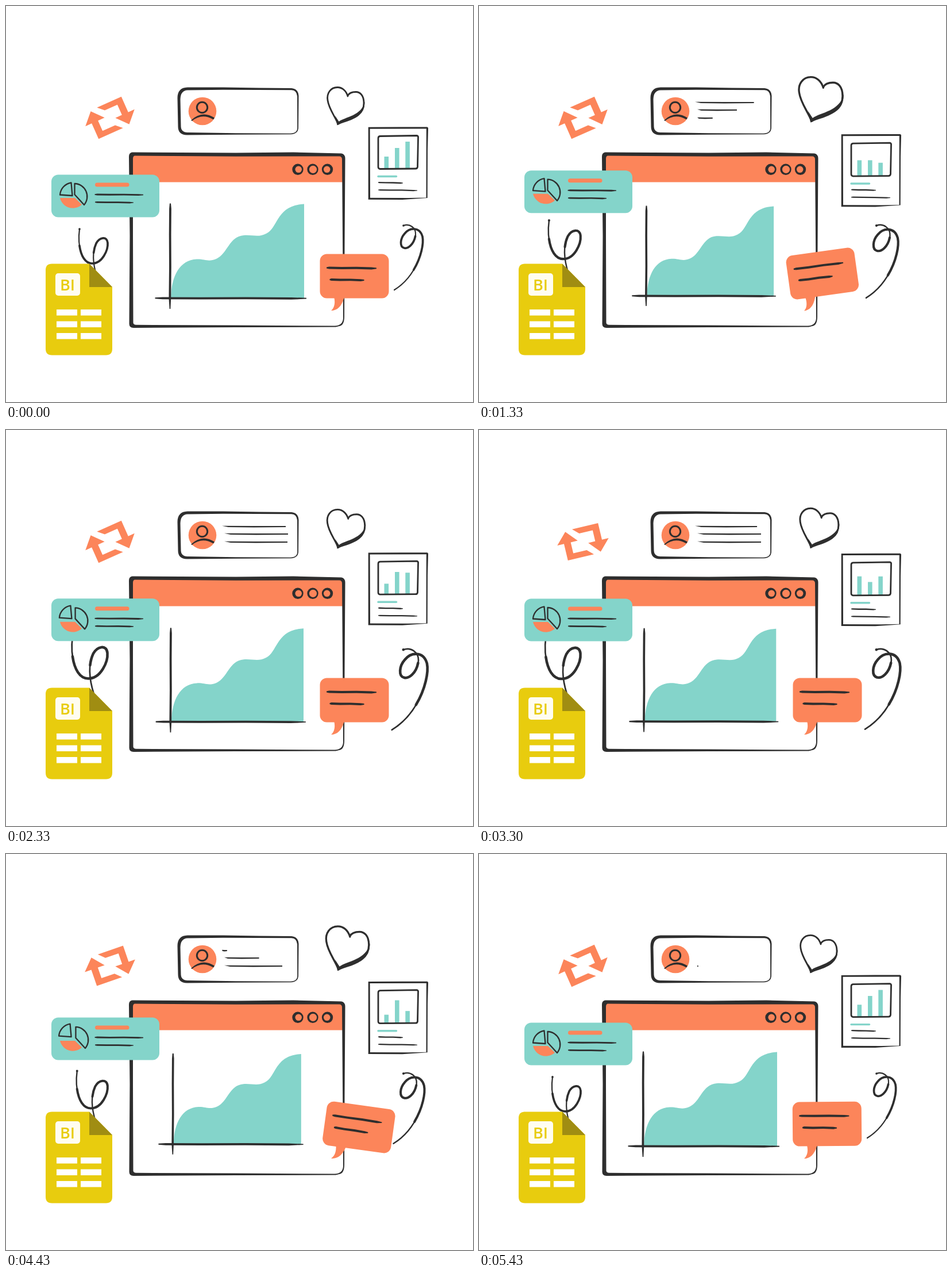
An HTML page for the animation above (5510 ms loop, 813x689 px).

```html
<!DOCTYPE html>
<html lang="en">
<head>
<meta charset="utf-8">
<title>Dashboard illustration</title>
<style>
  html, body { margin: 0; width: 100%; height: 100%; overflow: hidden; background: #fff; }
  svg { display: block; width: 100vw; height: 100vh; }
  .ink { fill: #2e2e2e; fill-rule: evenodd; }
  .line { fill: none; stroke: #2e2e2e; stroke-linejoin: round; stroke-linecap: round; }
  .orange { fill: #fc855a; }
  .teal { fill: #84d4ca; }
  .yellow { fill: #e8cc0e; }
  text { font: 600 27px "Open Sans", sans-serif; }
</style>
</head>
<body>
<svg viewBox="0 0 813 689" xmlns="http://www.w3.org/2000/svg">
  <g id="arrows">
    <path id="arrow" class="orange" d="M-13.500-25.500H33V4H45L26 24 8.500 4H21V-15.500H-3Z"/>
    <use href="#arrow" transform="rotate(180)"/>
  </g>

  <g id="profile">
    <path class="ink" d="M316 141.500L378 141.500 440 142.500 497 143Q508.500 144 509.500 156L509 212Q508.500 222.500 496 223.300L400 223.800 315 224.500Q299.500 224 299.500 210L298.500 160Q298.500 142 316 141.500Z
      M316 146.500Q304 147 303.500 162L304.500 209Q304.500 219.500 316 220L400 221.200 495 221.800Q507 221.500 507.200 212L507 157Q506 146.500 497 146.200L378 145.700Z"/>
    <circle class="orange" cx="342" cy="183" r="24.300"/>
    <circle class="line" cx="341.500" cy="176.500" r="9.200" stroke-width="3"/>
    <path class="ink" d="M322 199Q341 180.500 363 194.500L361 197.500Q341 186 324 200Z"/>
    <g id="rows"></g>
  </g>

  <g id="heart">
    <path class="line" stroke-width="2.800" d="M595 157C592 147 585 141.500 577 141.500C565 141.500 558 152 560 164C562 179 573 192 578 205.500C588 196 623 198 623 169C623 155 616 149.500 609 149.500C601 149.500 597 152 595 156"/>
    <path class="ink" d="M576.500 207.500C588 200 625 199 624.500 166C620 191 590 193 579.500 201L573 191Z"/>
  </g>

  <g id="report">
    <path class="ink" d="M630.700 210.800L690 210.500 733.500 210.500 735 212 734 250 733.700 334 690 337 630.700 336.800Z
      M633.600 213.700L634 333.700 700 334 731.500 333.500 731.800 213.500Z"/>
    <g id="bars" class="teal"></g>
    <path class="line" stroke-width="2.800" d="M651 226.500L715 225.500Q718 226 717.500 229L716.500 280Q716 283 713 283L651 283.500Q648 283 648 280L648 230Q648 227 651 226.500Z"/>
    <path fill="none" stroke="#84d4ca" stroke-width="3.400" stroke-linecap="round" d="M648 296.500H679.500"/>
    <g id="reportLines"></g>
  </g>

  <g id="window">
    <path class="orange" d="M220 260H586V306.500H220Z"/>
    <path class="ink" d="M220 254.500L400 255.500 500 254.500 584 256.500Q590.500 258 590.500 265L589.500 420 589 540Q589 556 580 557L574 558.500 400 559 222 560Q214.500 560 214.500 553L215.500 400 214 262Q214 255 220 254.500Z
      M224 260.500Q221 261 221 266L221 400 221.500 551Q222 555 227 554.800L400 555.500 572 556.500Q587 556 587 542L586 400 585 267Q585 261.500 580 261.500L400 261.800Z"/>
    <g id="buttons" class="ink"></g>
  </g>

  <g id="chart">
    <path class="teal" d="M287 508C288 470 302 442 332 440.500C346 440 352 446 366 440C386 431 388 401 414 399C430 398 440 403 453 396C474 386 470 347 519 344.500V508Z"/>
    <g id="axes"></g>
  </g>

  <g id="curlLeft" class="line"></g>
  <g id="curlRight" class="line"></g>

  <g id="card">
    <rect class="teal" x="79" y="293.500" width="188" height="74" rx="12"/>
    <path class="orange" d="M94 334H120L132 345.500A23 23 0 0 1 94 334Z"/>
    <path id="sliceLeft" class="line" stroke-width="2.300" d="M94 328.500A23 23 0 0 1 113.500 307.500L115.500 330Z"/>
    <path id="sliceRight" class="line" stroke-width="2.300" d="M119.500 309A22.500 22.500 0 0 1 136 346L119.500 328Z"/>
    <rect class="orange" x="155" y="307.500" width="59.500" height="7" rx="3.500"/>
    <g id="cardLines"></g>
  </g>

  <g id="bubble">
    <rect class="orange" x="546.500" y="431.500" width="120" height="77" rx="12"/>
    <path class="orange" d="M589 506C585 522 577 530 566 530C573 524 573 514 571 506Z"/>
    <g id="bubbleLines"></g>
  </g>

  <g id="sheet">
    <path class="yellow" d="M80 448.500H145L185 489V596.500Q185 607.500 174 607.500H80Q69 607.500 69 596.500V459.500Q69 448.500 80 448.500Z"/>
    <path fill="#a08d12" d="M145 448.500V489H185Z"/>
    <rect x="86" y="465" width="43" height="39" rx="5" fill="#fffdf0"/>
    <text class="yellow" x="94" y="495">BI</text>
    <g id="cells" fill="#fff"></g>
  </g>
</svg>
<script>
const LOOP = 5510;
const $ = id => document.getElementById(id);

function add(parent, tag, attrs) {
  const el = document.createElementNS('http://www.w3.org/2000/svg', tag);
  for (const key in attrs) el.setAttribute(key, attrs[key]);
  return $(parent).appendChild(el);
}

// Straight brush stroke, full for most of its length with narrow ends.
function brush(parent, x1, y1, x2, y2, width) {
  const dx = x2 - x1, dy = y2 - y1, k = width / 2 / Math.hypot(dx, dy);
  const at = (f, side) => `${x1 + dx * f - dy * k * side} ${y1 + dy * f + dx * k * side}`;
  add(parent, 'path', {
    class: 'ink',
    d: `M${at(0, .5)}L${at(.05, .9)} ${at(.3, 1)} ${at(.6, .8)} ${at(.9, 1)} ${at(1, .4)}
      ${at(1, -.4)} ${at(.9, -.8)} ${at(.6, -1)} ${at(.3, -.8)} ${at(.05, -.9)} ${at(0, -.5)}Z`
  });
}

// Curved stroke that is heavier along its middle.
function curl(parent, d) {
  add(parent, 'path', { d, 'stroke-width': 2.2 });
  add(parent, 'path', { d, 'stroke-width': 3.7, pathLength: 100, 'stroke-dasharray': '0 14 66 100' });
}

brush('reportLines', 648, 307, 691, 308, 2.6);
brush('reportLines', 648, 320, 716, 321, 2.5);
brush('axes', 286, 343.5, 285.5, 527, 4.2);
brush('axes', 259.5, 508.3, 523, 508.7, 4.2);
brush('cardLines', 154.5, 328, 239, 328.5, 3.2);
brush('cardLines', 155, 341.3, 222, 342, 3);
brush('bubbleLines', 558, 455.5, 645, 456.3, 4.4);
brush('bubbleLines', 563.5, 476, 623.5, 477, 4.4);
curl('curlLeft', 'M128 388C124 418 132 448 150 448C168 448 178 424 177 412C176 400 163 402 157 413C150 428 151 448 158 470');
curl('curlRight', 'M692 382C703 378 714 386 713 398C711 414 700 423 693 421C685 419 686 405 694 396C703 385 720 384 725 401C729 420 715 470 676 494');

const ring = (cx, r) => `M${cx - r} 284.3a${r} ${r} 0 1 0 ${2 * r} 0a${r} ${r} 0 1 0 ${-2 * r} 0Z`;
for (const [x, shift, hole] of [[508, 1.2, 5.8], [534, .5, 6.6], [559.5, -.8, 5.8]])
  add('buttons', 'path', { d: ring(x, 9.7) + ring(x + shift, hole) });

for (const y of [528, 548.5, 569])
  for (const x of [88, 130]) add('cells', 'rect', { x, y, width: 36, height: 10.5 });

const rows = [
  { x: 376, y: 168, start: 0, leave: 3150, fade: 1550 },
  { x: 380, y: 181, start: 400, leave: 3680, fade: 1600 },
  { x: 380, y: 195, start: 820, leave: 4180, fade: 1350 }
];
for (const row of rows) row.el = add('rows', 'path', { class: 'ink' });

const bars = [
  { x: 658.5, keys: [[0, 21], [930, 39.5], [1750, 14], [2755, 21]] },
  { x: 677, keys: [[0, 36], [900, 16], [1850, 42], [2755, 36]] },
  { x: 695.3, keys: [[0, 47], [900, 25], [1720, 21], [2755, 47]] }
];
for (const bar of bars) bar.el = add('bars', 'rect', { x: bar.x, width: 7.6 });

const smooth = x => { x = Math.min(1, Math.max(0, x)); return x * x * (3 - 2 * x); };

function tween(t, keys) {
  const i = Math.max(1, keys.findIndex(k => k[0] >= t));
  const [t0, a] = keys[i - 1], [t1, b] = keys[i];
  return a + (b - a) * smooth((t - t0) / (t1 - t0));
}

const wave = (t, period) => (1 - Math.cos(2 * Math.PI * t / period)) / 2;
const place = (id, transform) => $(id).setAttribute('transform', transform);
const scaleAt = (x, y, s) => `translate(${x} ${y}) scale(${s}) translate(${-x} ${-y})`;

const spin = [[0, 0], [600, 16], [1380, 0], [2600, 0], [3600, 13.5], [5000, 0], [LOOP, 0]];
const lift = [[0, 0], [900, -9], [2450, 0], [3530, 0], [4450, -9], [5420, 0], [LOOP, 0]];
const tilt = [[0, 0], [650, -14], [2150, 0], [3450, 0], [4350, 8], [5430, -.5], [LOOP, 0]];
const burst = [[0, 0], [600, 1], [1330, 0], [2000, 1], [2700, 0], [3250, 0], [4300, 1], [5430, 0], [LOOP, 0]];

function draw(t) {
  const half = wave(t, LOOP / 2), full = wave(t, LOOP), pulse = half ** 1.15;

  place('arrows', `translate(181 194.5) rotate(${tween(t, spin) - 24})`);
  place('heart', scaleAt(573, 231, 1 + .2 * pulse));
  place('chart', scaleAt(398, 427, 1 - .049 * pulse));
  place('report', `translate(0 ${12.6 * half})`);
  place('curlLeft', scaleAt(179, 514, 1 + .25 * full));
  place('curlRight', scaleAt(693, 381, 1 + .26 * full));
  place('card', `translate(0 ${tween(t, lift)})`);
  place('bubble', `rotate(${tween(t, tilt)} 570 530)`);

  const gap = tween(t, burst);
  place('sliceLeft', `translate(${-2 * gap} ${-3 * gap})`);
  place('sliceRight', `translate(${2 * gap} ${gap})`);

  for (const { keys, el } of bars) {
    const h = tween(t % (LOOP / 2), keys);
    el.setAttribute('y', 283 - h);
    el.setAttribute('height', h);
  }

  for (const { x, y, start, leave, fade, el } of rows) {
    const w = 111 * (smooth((t - start) / 1600) - smooth((t - leave) / fade));
    el.setAttribute('d', w < .8 ? '' :
      `M${x} ${y - 1.3}L${x + w * .5} ${y - 1.1}L${x + w} ${y - .9}V${y + 1.1}L${x + w * .5} ${y + 1.5}L${x + w * .1} ${y + 1}Z`);
  }
}

const begin = performance.now();
function tick() {
  draw((performance.now() - begin) % LOOP);
  requestAnimationFrame(tick);
}
tick();
</script>
</body>
</html>
```
